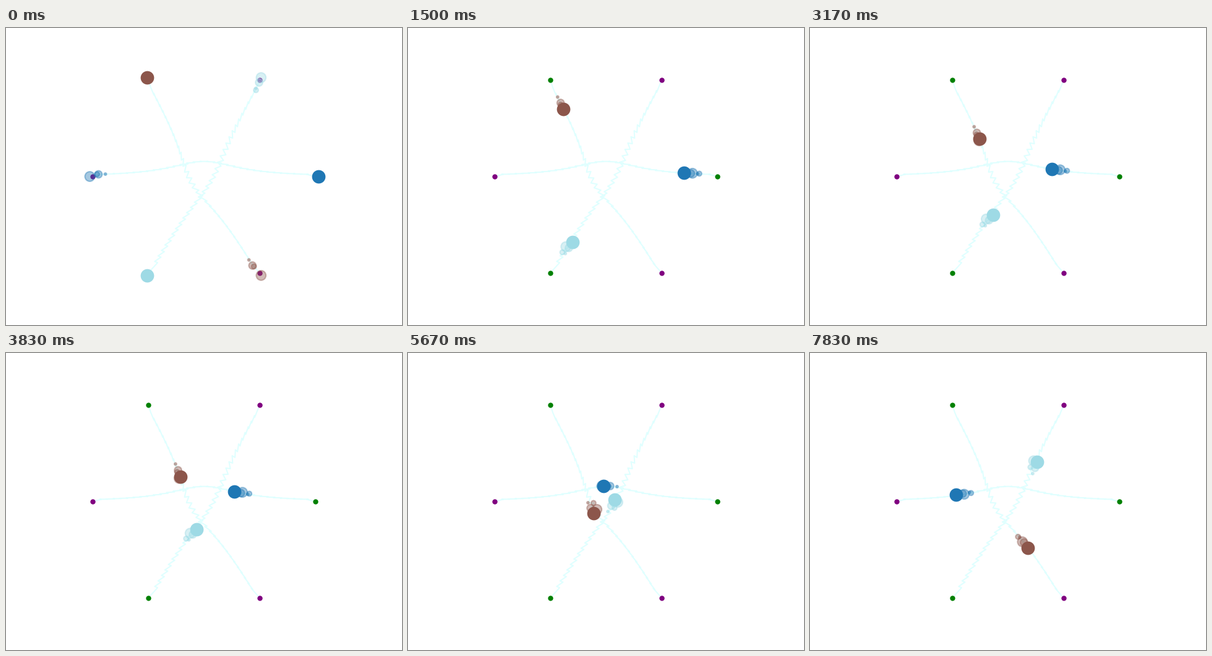
Recreate the animation shown at these times as a matplotlib script. Size 640 by 480 pixels, loop 8 s.

```python
import numpy as np
import matplotlib.pyplot as plt
from matplotlib.animation import FuncAnimation

W, H, DPI = 640, 480, 100
LOOP_MS, TICK_MS = 8000, 20
LOOP_STEPS = 48            # steps taken in one loop
STEPS = 66                 # length of a whole walk
TAIL = 5                   # the agent and its shrinking ghosts
RADIUS, SPREAD = 180, 1.0256
SWAY = 4

# colour, start angle, reach, lead, detour, sway angle, sway turn, turn step
AGENTS = [
    ("#1f77b4", 0, 180, 0, 25, 180, 0, 0),
    ("#8c564b", 120, 173, 0, 23, 110, -160, 31),
    ("#9edae5", 240, 174, 3.5, 14, 18, -128, 44),
]


def spin(degrees):
    return np.exp(1j * np.radians(degrees))


def screen(z):
    return np.column_stack([W / 2 + np.real(z), H / 2 - np.imag(z)])


def walk(start, reach, lead, detour, tilt, turn, mid):
    """Cross the ring with a bulge to the left, swaying on every other step."""
    k = np.arange(STEPS)
    x = np.linspace(reach, -reach, STEPS) - lead
    y = detour / (1 + (x / 70) ** 2)
    swing = spin(tilt + turn / (1 + np.exp((mid - k) / 5)))
    z = (x + 1j * y) * spin(start) - (-1) ** k * SWAY * swing
    z[0] = RADIUS * SPREAD * spin(start)
    z[-1] = -z[0]
    return z


fig = plt.figure(figsize=(W / DPI, H / DPI), dpi=DPI, facecolor="white")
ax = fig.add_axes([0, 0, 1, 1])
ax.set_xlim(0, W)
ax.set_ylim(H, 0)
ax.axis("off")

sizes = 200 * (1 - np.arange(TAIL) / TAIL) ** 2
movers = []
for color, start, *habits in AGENTS:
    z = walk(start, *habits)
    ax.plot(*screen(z / SPREAD).T, color="lightcyan", lw=1.5, zorder=1)
    for side, shade in ((1, "green"), (-1, "purple")):
        ax.plot(*screen(side * RADIUS * spin(start)).T, "o", color=shade,
                ms=5, zorder=2)

    path = screen(z)
    ghosts = ax.scatter(*path[:TAIL - 1].T, s=sizes[1:], color=color,
                        alpha=0.4, linewidths=1.5, zorder=3)
    body = ax.scatter(*path[0], s=sizes[0], color=color, linewidths=1.5, zorder=4)
    movers.append((path, ghosts, body))


def draw(tick):
    # the small offset lets a step start on the tick nearest to its time
    k = (tick * TICK_MS + 14) * LOOP_STEPS // LOOP_MS % LOOP_STEPS
    for path, ghosts, body in movers:
        body.set_offsets(path[k])
        # negative steps wrap round to the end of the walk
        ghosts.set_offsets(path[k - np.arange(1, TAIL)])
    return [m for _, *pair in movers for m in pair]


anim = FuncAnimation(fig, draw, frames=LOOP_MS // TICK_MS, interval=TICK_MS,
                     init_func=lambda: draw(0), repeat=True, repeat_delay=0)
plt.show()
```
